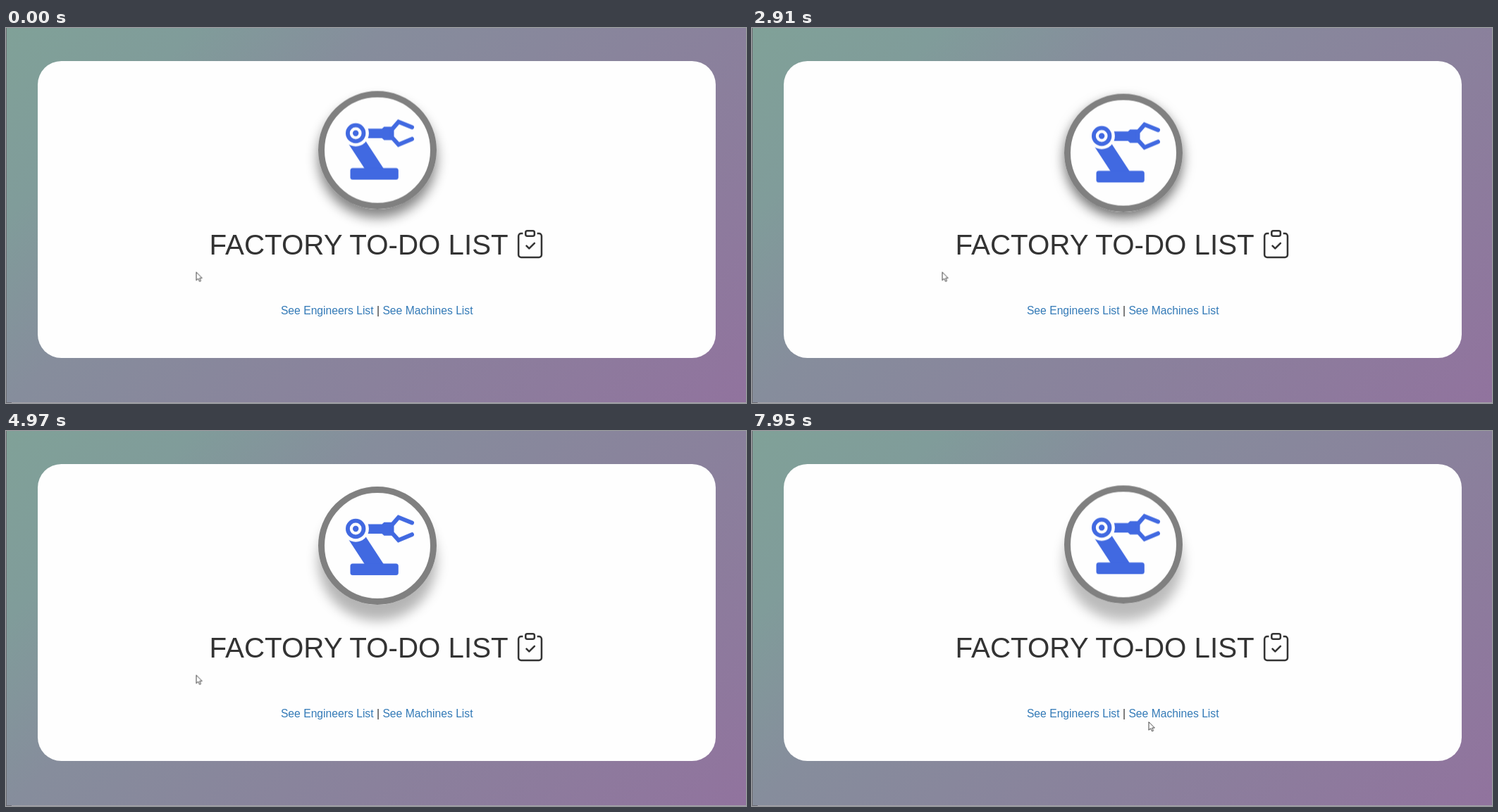
An HTML page for the animation above (8000 ms loop, 1050 by 533 pixels).

```html
<!DOCTYPE html>
<html lang="en">
<head>
<meta charset="utf-8">
<title>Factory to-do list</title>
<style>
  html, body { margin: 0; width: 100%; height: 100%; overflow: hidden; }
  body {
    position: relative;
    background: linear-gradient(135deg, #80a198, #809c9a 17%, #868d9c 34%, #8a819c 65%, #91739e);
    font-family: "Liberation Sans", Arial, sans-serif;
  }
  .edge { position: absolute; left: 0; bottom: 0; background: #6c6c72; }
  .side { width: 1px; height: 100%; }
  .base { width: 100%; height: 1px; background: #a4a2a8; }
  .foot { width: 8px; height: 1px; }
  .card {
    position: absolute; left: 45px; top: 47px; width: 962px; height: 422px;
    border-radius: 33.6px; background: #fefefe;
  }
  .disc {
    position: absolute; left: 442.5px; top: 96.2px; width: 168px; height: 168px;
    border-radius: 50%; background: #fefefe;
    animation: float 9.6s ease-in-out infinite paused;
    animation-delay: calc(var(--t) - 7.81s);
  }
  .layer { position: absolute; left: 0; top: 0; }
  .title { font-size: 40.32px; fill: #333; }
  .links { font-size: 15.7px; fill: #333; }
  .links a { fill: #337ab7; }
  .first { animation: hover 8s step-end infinite paused; animation-delay: var(--t); }
  .pointer { animation: point 8s linear infinite paused; animation-delay: var(--t); }

  @keyframes float {
    0%, 100% { transform: translateY(0); box-shadow: 0 5.6px 16.8px rgba(0, 0, 0, .6); }
    50% { transform: translateY(-22.4px); box-shadow: 0 28px 16.8px rgba(0, 0, 0, .2); }
  }
  @keyframes point {
    0%, 65.6% { transform: translate(269.5px, 346.5px); }
    70%, 72.4% { transform: translate(476.5px, 451px); }
    78.5%, 85% { transform: translate(484px, 430px); }
    86.9%, 88.3% { transform: translate(491px, 405px); }
    89.8%, 91.3% { transform: translate(498.5px, 418px); }
    97.8% { transform: translate(552px, 417px); }
    99.3%, 100% { transform: translate(562.5px, 413px); }
  }
  @keyframes hover {
    0%, 88.4% { fill: #337ab7; text-decoration: none; }
    86.8% { fill: #23527c; text-decoration: underline; }
  }
</style>
</head>
<body>
<div class="edge side"></div>
<div class="edge base"></div>
<div class="edge foot"></div>
<div class="card"></div>

<div class="disc">
  <svg class="layer" width="168" height="168" viewBox="442.5 89.8 168 168" fill="#4169e1">
    <circle cx="526.5" cy="173.8" r="79.5" fill="none" stroke="#808080" stroke-width="9"/>
    <path d="M481 158L509 201H536L506 155Z"/>
    <rect x="488" y="199.3" width="68.3" height="16.5" rx="3.5"/>
    <path d="M508 143.3H533L536 140.5H547V159.5H536L533 156.7H508Z"/>
    <path d="M575.5 141.3L556.5 133.6L547 144.5V155.5L556.5 166L575.5 158"
      fill="none" stroke="#4169e1" stroke-width="6" stroke-linecap="round"/>
    <circle cx="495.7" cy="149.8" r="18.7" fill="#fefefe"/>
    <circle cx="495.7" cy="149.8" r="11.3" fill="none" stroke="#4169e1" stroke-width="5.8"/>
    <circle cx="495.7" cy="149.8" r="4.2"/>
  </svg>
</div>

<svg class="layer" width="1050" height="533">
  <text class="title" x="288.6" y="322.3">FACTORY TO-DO LIST</text>
  <g transform="translate(723.4 287) scale(2.52)" fill="none" stroke="#333">
    <path d="M4 2H3A1.5 1.5 0 0 0 1.5 3.5V14A1.5 1.5 0 0 0 3 15.5H13A1.5 1.5 0 0 0 14.5 14V3.5A1.5 1.5 0 0 0 13 2H12"/>
    <rect x="5.5" y=".5" width="5" height="3" rx="1"/>
    <path d="M6 9L7.5 10.5L10.5 7.5" stroke-linecap="round" stroke-linejoin="round"/>
  </g>
  <text class="links" x="389.9" y="406.5"><a class="first">See Engineers List</a> | <a>See Machines List</a></text>
  <path class="pointer" d="M.5 .5V12.2L3.2 9.7L5.1 13.8L7 13L5.2 9H8.8Z"
    fill="#fff" stroke="#333" stroke-width=".9" stroke-linejoin="round"/>
</svg>

<script>
  const LOOP = 8000;
  const start = performance.now();
  // Paused animations are positioned through a negative delay.
  function draw() {
    const t = (performance.now() - start) % LOOP;
    document.documentElement.style.setProperty("--t", `${-t}ms`);
    requestAnimationFrame(draw);
  }
  draw();
</script>
</body>
</html>
```
